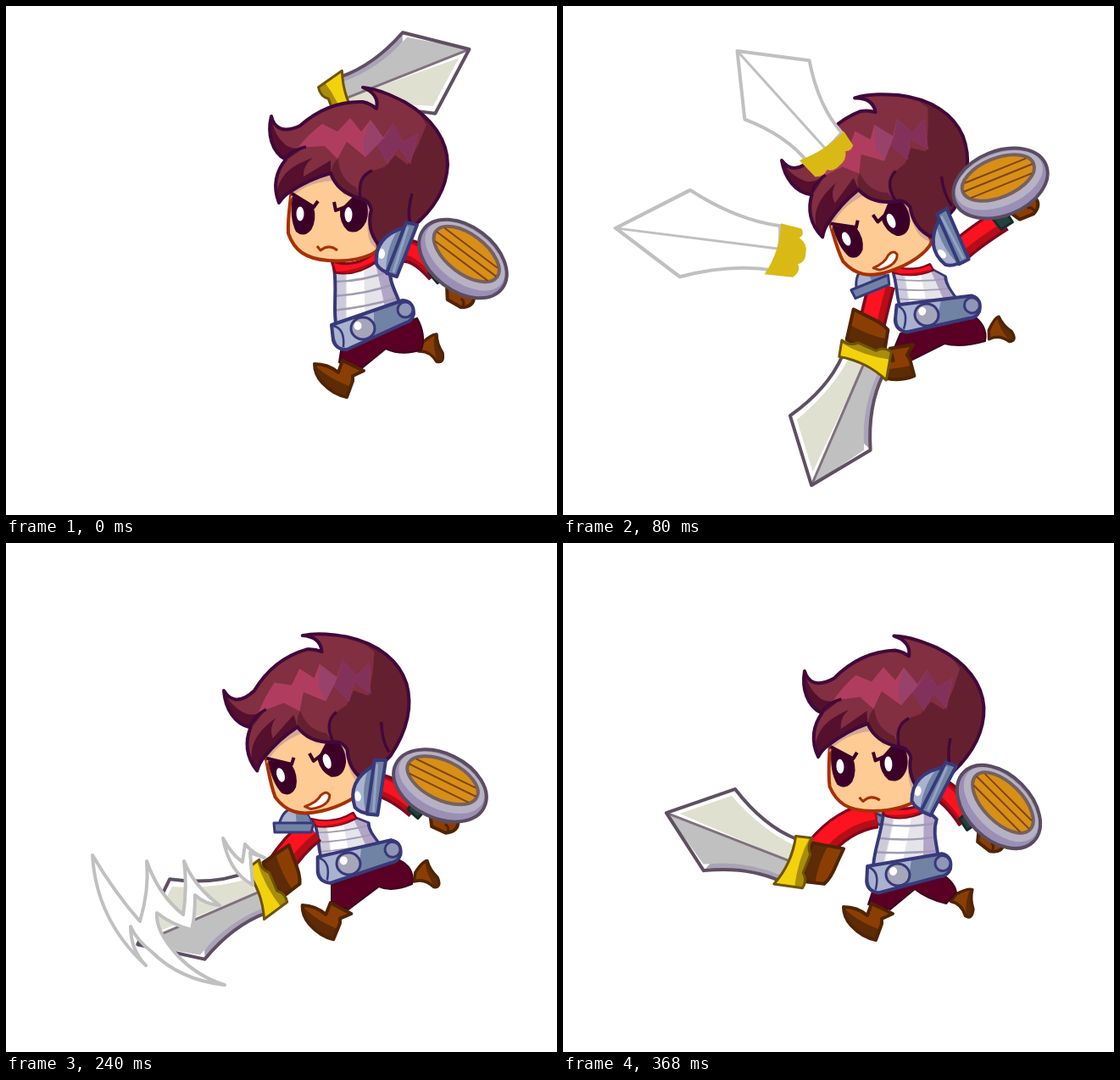
Write an HTML page with a canvas that moves like this. It is 650 px wide and 600 px high and loops after 0.4 s.

```html
<!DOCTYPE html>
<html lang="en">
<head>
<meta charset="utf-8">
<title>Sword swing</title>
<style>
html, body { margin: 0; width: 100%; height: 100%; overflow: hidden; background: #fff; }
canvas { display: block; width: 650px; height: 600px; }
</style>
</head>
<body>
<canvas id="stage" width="650" height="600"></canvas>
<script>
const ctx = document.getElementById('stage').getContext('2d');
const STEP = 80, STEPS = 5, RAD = Math.PI / 180;

const C = {
  hairLine: '#41083b', hair: '#812f41', hairDark: '#65202f', hairLight: '#b03d5f', fringe: '#54102c',
  skin: '#ffcb94', skinDark: '#d6a894', faceLine: '#a83005', eye: '#3c0028',
  red: '#fd1220', redDark: '#b60e17', redLine: '#7d0820',
  steel: '#7083a5', steelLight: '#a9b3cf', steelLine: '#37397a',
  plate: '#e4e4ea', plateDark: '#b3a5c6', knob: '#a6a6ba',
  pants: '#5a0024', boot: '#8b3e04', bootDark: '#5d2b05', bootLine: '#4f2404',
  blade: '#c0c0c0', bladeLight: '#dfe0d0', bladeLine: '#5f4f62', trail: '#c0c0c0',
  gold: '#f2d20c', goldFlat: '#d9b915', goldLine: '#6e5306',
  rim: '#b6b2c4', rimDark: '#9a8fb4', rimLine: '#5b4c60', wood: '#d78f16', woodLine: '#80450f'
};

// Poses: x, y, degrees; one entry per step of the swing.
const head = [[313,130,0], [258,182,-23], [260,182,-21], [257,174,-17.5], [285,151,-4]];
const belt = [[421,380,0], [429,364,12], [417,376,11.5], [404,378,6], [395,391,9.5]];
const shield = [[539,298,37], [516,209,-22], [519,256,8], [512,286,26], [514,311,45]];
const fist = [[534,341,30], [543,238,-22], [531,298,5], [515,328,25], [503,349,38]];
const pad = [[468,287,0], [461,271,-45], [448,282,-24], [438,288,-13], [444,290,6]];
const farPad = [null, [362,328,-22], [357,340,-13], [339,332,0], [372,322,20]];
const blade = [[403,107,-21.3], [355,424,113.7], [316,435,150.5], [297,413,157], [265,375,201.7]];
const frontBoot = [[393,440,0], [395,424,-35], [381,442,3], [378,446,2], [360,447,0]];
const rearBoot = [[500,403,0], [513,384,-23], [499,397,-23], [493,392,-14], [471,422,15]];
// Torso anchors: buckle, side knob, neck.
const torso = [
  [421,380, 471,358, 408,305], [429,364, 474,355, 408,311], [417,376, 463,366, 398,324],
  [404,378, 450,363, 384,328], [395,391, 447,378, 399,315]
];
// Arms: shoulder, bend, wrist.
const rearArm = [
  [462,290, 482,282, 510,314], [462,294, 480,276, 518,252], [450,272, 470,284, 500,291],
  [438,285, 460,290, 485,312], [440,288, 458,295, 479,326]
];
const swordArm = [
  null, [376,328, 370,350, 362,385], [368,345, 358,360, 346,396],
  [362,338, 340,355, 321,384], [370,320, 330,326, 301,362]
];
const legs = [
  'M396 400L485 368Q496 388 490 405Q468 413 448 404L416 430L393 420Z',
  'M398 386L480 362Q502 376 498 395Q470 403 450 398L410 418L388 410Z',
  'M386 402L472 376Q492 386 485 408Q465 415 445 410L408 431L387 424Z',
  'M384 403L462 373Q483 382 479 402Q455 412 440 405L404 432L384 426Z',
  'M366 408L440 386Q462 398 464 412L452 425Q430 420 415 408L386 432L360 426Z'
];

function paint(d, fill, line, width = 4) {
  const p = new Path2D(d);
  if (fill) { ctx.fillStyle = fill; ctx.fill(p); }
  if (line) { ctx.strokeStyle = line; ctx.lineWidth = width; ctx.stroke(p); }
}

function oval(x, y, rx, ry, fill, line, width = 3, turn = 0) {
  ctx.beginPath();
  ctx.ellipse(x, y, rx, ry, turn * RAD, 0, 7);
  if (fill) { ctx.fillStyle = fill; ctx.fill(); }
  if (line) { ctx.strokeStyle = line; ctx.lineWidth = width; ctx.stroke(); }
}

function inside(d, draw) {
  ctx.save();
  ctx.clip(new Path2D(d));
  draw();
  ctx.restore();
}

function place([x, y, deg], draw, px = 0, py = 0, sx = 1) {
  ctx.save();
  ctx.translate(x, y);
  ctx.rotate(deg * RAD);
  ctx.scale(sx, 1);
  ctx.translate(-px, -py);
  draw();
  ctx.restore();
}

// Affine map that carries three anchor points onto three others.
function fit(a, b, draw) {
  const [ux, uy, vx, vy] = [a[2] - a[0], a[3] - a[1], a[4] - a[0], a[5] - a[1]];
  const det = ux * vy - vx * uy;
  const col = i => {
    const p = b[2 + i] - b[i], q = b[4 + i] - b[i];
    return [(p * vy - q * uy) / det, (q * ux - p * vx) / det];
  };
  const [m11, m21] = col(0), [m12, m22] = col(1);
  ctx.save();
  ctx.transform(m11, m12, m21, m22,
    b[0] - m11 * a[0] - m21 * a[1], b[1] - m12 * a[0] - m22 * a[1]);
  draw();
  ctx.restore();
}

function arm([x, y, bx, by, ex, ey], size) {
  const d = `M${x} ${y}Q${bx} ${by} ${ex} ${ey}`;
  paint(d, null, C.redLine, size);
  paint(d, null, C.redDark, size - 7);
  ctx.save();
  ctx.translate(-3, -3);
  paint(d, null, C.red, size - 15);
  ctx.restore();
}

function drawFace(angry) {
  paint('M337 214C336 230 332 247 333 268C340 288 353 298 380 300C405 302 428 297 438 288L436 230L383 190Z',
    C.skin, C.faceLine);
  paint('M335 228Q352 208 385 206L402 226L384 193L340 212Z', C.skinDark);
  paint('M418 224L430 238L437 286Q424 279 427 250Z', C.skinDark);
  paint('M338 224L363 237Q367 252 360 264Q351 274 342 266Q334 250 338 224Z', C.eye);
  paint('M394 240L418 216Q431 236 425 254Q417 271 403 265Q393 256 394 240Z', C.eye);
  paint('M337 221L363 237L368 230M387 231L389 241L413 232', null, C.eye, 4);
  oval(347, 245, 4.5, 8.5, '#fff');
  oval(404, 246, 4.5, 9, '#fff');
  if (angry) paint('M363 289Q378 289 385 282Q393 278 395 285Q391 297 369 294Z', '#fff', C.faceLine, 3);
  else paint('M367 283L371 288Q381 280 391 288', null, C.faceLine, 3);
}

const hairShape = 'M313 130C316 143 326 151 347 141C365 125 388 112 421 113Q430 115 437 121Q441 104 421 96' +
  'C440 98 458 107 470 113C505 133 521 160 521 187C520 215 505 240 478 262L440 282C430 270 427 255 431 240' +
  'Q428 228 418 227C400 222 388 212 383 197C365 202 347 211 335 219Q327 224 322 232C314 212 319 194 330 181' +
  'C313 172 308 150 313 130Z';

function drawHair() {
  paint(hairShape, C.hair);
  inside(hairShape, () => {
    paint('M313 128Q314 150 330 164Q339 170 352 167L330 182Q304 168 308 128Z', C.fringe);
    paint('M320 236C316 206 330 190 362 179Q350 188 351 201L383 182V198L335 220Z', C.fringe);
    paint('M478 112L496 140L487 162L474 187L459 176L446 190L432 194Q416 205 418 227L440 284L530 262V130Z', C.hairDark);
    paint('M383 197Q386 183 392 180Q393 204 413 214L418 228Q392 220 383 197Z', C.hairDark);
    paint('M344 167Q358 150 373 139L391 148L406 132L419 148L430 134L445 155L457 138L468 160L487 150' +
      'L477 186L463 166L450 187L438 163L424 178L402 160L391 180L376 165Z', C.hairLight);
    paint('M446 155L457 138L468 160L487 150L477 186L463 166L450 187L438 164Z', '#82325a');
    paint('M421 160L430 134L445 155L438 164L424 178Z', '#98416a');
  });
  paint(hairShape, null, C.hairLine);
  paint('M328 182Q337 169 354 166M418 227Q414 201 432 194M477 258Q473 242 479 221', null, C.hairLine, 3.5);
}

function drawTorso() {
  const d = 'M387 308C391 338 385 358 390 380L468 360C462 340 451 326 453 308L437 298Z';
  paint(d, C.plate);
  inside(d, () => {
    paint('M380 300L400 300Q402 340 400 385L380 385Z', '#cdcbd9');
    paint('M402 300L422 300L424 390L402 390Z', '#fff');
    paint('M434 295Q443 335 450 370L480 370V295Z', C.plateDark);
    paint('M385 325Q421 325 454 312M385 342Q425 340 460 327M385 359Q425 355 466 343', null, '#a19bb5', 2.5);
  });
  paint(d, null, C.steelLine);
  paint('M384 300Q410 311 436 290L439 300Q413 319 388 314Z', C.red, C.redLine, 3);
  paint('M389 313Q414 313 438 298Q414 320 389 313Z', C.redDark);
}

function drawBelt() {
  const d = 'M384 376L468 347Q481 348 481 363Q479 372 470 374L402 405Q389 405 386 394Z';
  paint(d, C.steel);
  inside(d, () => paint('M380 370L434 352V395L395 410Z', C.steelLight));
  paint('M386 377Q400 380 398 402', null, C.steelLine, 2.5);
  paint(d, null, C.steelLine);
  oval(471, 358, 9, 9, '#8f96b6', C.steelLine);
  oval(421, 380, 14, 13, C.knob, C.steelLine);
  oval(415, 377, 4.5, 5, '#fff');
}

function drawPad() {
  const dome = 'M437 304Q434 272 470 261L454 315Q442 313 437 304Z';
  paint(dome, C.steel);
  inside(dome, () => {
    paint('M430 318L432 268Q456 262 461 266Q448 287 448 315Z', C.steelLight);
    oval(443, 292, 4, 6, '#fff');
  });
  paint(dome, null, C.steelLine);
  paint('M472 255L485 258L461 319L449 315Z', C.steel, C.steelLine);
  paint('M474 260L457 314', null, '#94a3c4', 3);
}

function drawFarPad() {
  paint('M-17 0Q-12 -20 4 -20Q18 -18 21 0Z', C.steelLight, C.steelLine, 3);
  paint('M2 -19Q18 -17 21 0L4 0Z', C.steel);
  paint('M-23 -2L24 -2L21 9L-22 9Z', C.steel, C.steelLine, 3);
}

function drawShield() {
  oval(0, 0, 58, 38, C.rimDark, C.rimLine, 4);
  oval(0, -4, 54, 31, C.rim);
  oval(0, -7, 45, 23, C.wood, '#76605f', 4);
  paint('M-39 -16L39 -16M-44 -7L44 -7M-39 3L39 3', null, C.woodLine, 2);
}

function drawFist() {
  paint('M-21 -8Q0 -16 17 -7Q22 4 9 11L-9 11Z', C.boot, C.bootLine);
  paint('M4 2Q10 2 11 9', null, C.bootLine, 3);
}

function drawCuff([, , bx, by, ex, ey]) {
  place([ex, ey, Math.atan2(ey - by, ex - bx) / RAD], () => paint('M-9 -9L9 -7V9L-7 9Z', '#24413d', '#142b2a', 3));
}

const bladeShape = 'M0 28Q42 28 89 56L154 0L88 -47Q42 -23 0 -25Q-4 0 0 28Z';

function drawSword() {
  paint(bladeShape, '#fff');
  inside(bladeShape, () => {
    paint('M0 1L154 0L91 -40Q42 -18 0 -18Z', C.blade);
    paint('M0 1L139 5L90 47Q42 23 0 20Z', C.bladeLight);
    paint('M0 -30L20 -24Q50 -26 88 -48L84 -37Q48 -18 0 -18Z', '#aaa3b8');
  });
  paint('M0 1L154 0', null, '#80717f', 3);
  paint(bladeShape, null, C.bladeLine);
  const d = 'M2 31L-17 36Q-14 25 -22 17L-22 -6Q-30 -12 -28 -23L5 -31Q-6 0 2 31Z';
  paint(d, C.gold);
  inside(d, () => paint('M-30 38L-14 36Q-10 6 -20 -30L-34 -26Z', '#a98d09'));
  paint(d, null, C.goldLine, 3);
}

function drawGlove() {
  const d = 'M-20 31L-56 38L-55 20Q-55 0 -50 -9L-27 -15Q-16 8 -20 31Z';
  paint(d, C.boot);
  inside(d, () => paint('M-15 35L-38 40Q-34 10 -40 -14L-12 -16Z', C.bootDark));
  paint(d, null, C.bootLine);
}

function drawGhost() {
  paint(bladeShape, '#fff', C.trail, 4);
  paint('M0 1L154 0', null, C.trail, 3);
  paint('M0 31L-20 28Q-24 21 -19 17Q-28 11 -27 0Q-28 -10 -21 -14Q-25 -22 -18 -30L9 -31Q-3 0 0 31Z', C.goldFlat);
}

function drawFrontBoot() {
  const d = 'M364 422Q380 422 392 432L397 418L422 430L409 436L409 442L402 461Q386 458 373 444Q364 434 364 422Z';
  paint(d, C.boot);
  inside(d, () => paint('M362 420Q374 436 405 448L400 464L360 440Z', C.bootDark));
  paint(d, null, C.bootLine);
}

function drawRearBoot() {
  const d = 'M487 407L491 397Q503 386 508 387Q508 398 515 409Q517 422 508 419Q500 406 487 407Z';
  paint(d, C.boot);
  inside(d, () => paint('M506 385Q502 400 510 422L520 420L514 385Z', C.bootDark));
  paint(d, null, C.bootLine, 3.5);
}

const trails = {
  2: [
    'M252 36C168 65 88 165 67 280Q72 248 92 225C75 300 93 385 149 443C124 390 123 310 142 238' +
      'Q148 285 170 320Q166 285 181 239Q186 310 209 372Q204 300 221 240Q228 285 249 315Q246 296 258 283' +
      'Q270 283 281 298Q280 281 274 267Q263 276 243 278Q258 248 262 220Q247 246 229 258' +
      'Q248 225 257 184Q237 210 213 232Q224 180 255 145Q203 180 170 238Q184 137 237 76Q190 103 158 140Q190 72 252 36Z',
    'M23 203Q23 242 34 270Q50 205 83 148C51 220 40 290 49 365C20 315 14 255 23 203Z'
  ],
  3: [
    'M102 368Q128 412 158 446Q169 410 166 375Q180 415 209 438Q214 405 210 375Q222 405 252 427' +
      'Q235 426 223 415Q223 440 219 456Q196 450 178 436Q176 457 202 486Q226 511 258 521' +
      'Q205 515 172 482Q154 468 147 452Q147 480 165 498C128 464 105 420 102 368Z',
    'M256 348Q266 367 279 376L282 355Q291 366 305 371L288 365L291 403Q263 388 256 348Z'
  ]
};

function drawStep(i) {
  ctx.fillStyle = '#fff';
  ctx.fillRect(0, 0, 650, 600);
  ctx.lineJoin = 'round';
  if (i === 0) place(blade[i], drawSword);
  place(rearBoot[i], drawRearBoot, 500, 403);
  paint(legs[i], C.pants, '#3f0420', 2);
  place(frontBoot[i], drawFrontBoot, 393, 440);
  arm(rearArm[i], 29);
  place(fist[i], drawFist);
  drawCuff(rearArm[i]);
  if (i === 4) place(farPad[i], drawFarPad);
  fit(torso[0], torso[i], drawTorso);
  place(belt[i], drawBelt, 421, 380);
  if (swordArm[i]) arm(swordArm[i], 33);
  if (i > 0 && i < 4) place(farPad[i], drawFarPad);
  place(head[i], () => { drawFace(i > 0 && i < 4); drawHair(); }, 313, 130);
  place(pad[i], drawPad, 468, 287);
  place(shield[i], drawShield);
  if (i > 0) place(blade[i], () => { drawGlove(); drawSword(); });
  if (i === 1) {
    place([308, 168, 228.3], drawGhost);
    place([253, 287, 187.5], drawGhost, 0, 0, 1.25);
  }
  (trails[i] || []).forEach(d => paint(d, '#fff', C.trail, 4));
}

let shown = -1;
const start = performance.now();
function tick(now) {
  const i = Math.floor(Math.max(0, now - start) / STEP) % STEPS;
  if (i !== shown) drawStep(shown = i);
  requestAnimationFrame(tick);
}
tick(start);
</script>
</body>
</html>
```
